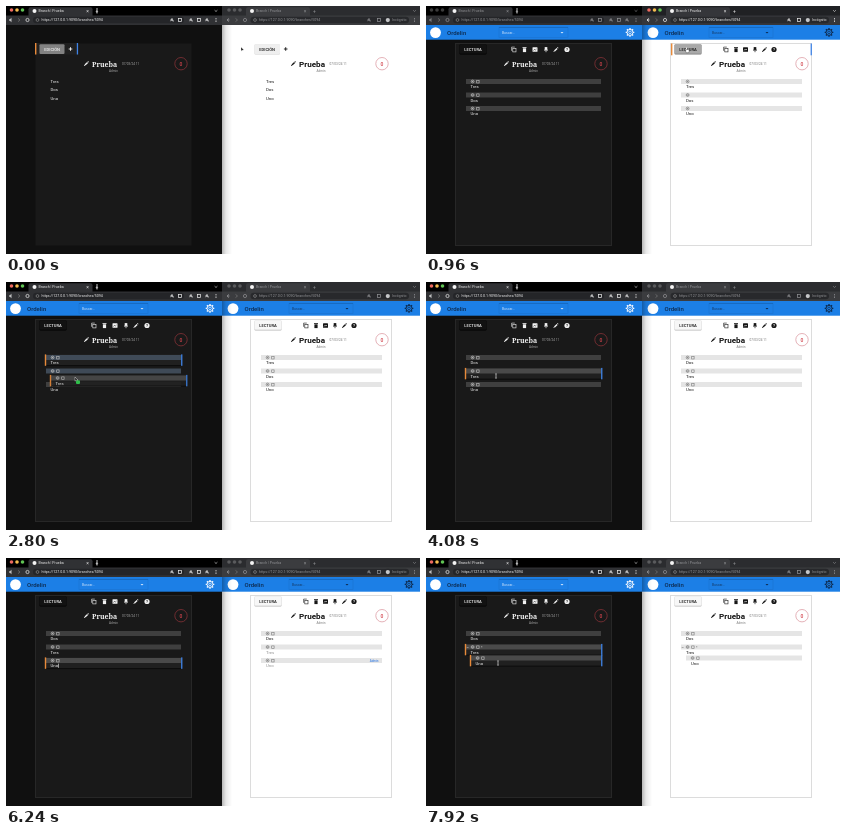
These frames come from a looping animation (414 by 248 pixels, 8 s). An HTML page with a canvas:

```html
<!DOCTYPE html>
<html lang="es">
<head>
<meta charset="utf-8">
<style>
html, body { margin: 0; width: 100%; height: 100%; overflow: hidden; background: #111; }
canvas { display: block; width: 414px; height: 248px; }
</style>
</head>
<body>
<canvas id="stage"></canvas>
<script>
const W = 414, H = 248, LOOP = 8000, STEP = 80, TOP = 19;
const canvas = document.getElementById('stage');
const scale = window.devicePixelRatio || 1;
canvas.width = W * scale;
canvas.height = H * scale;
const c = canvas.getContext('2d');
const SANS = 'Roboto, "Open Sans", sans-serif';
const SERIF = '"Noto Serif", serif';
const ORANGE = '#e88a3a', BLUE = '#3f83e6', BAR = '#1c7fe6';

const dark = {
  x: 0, w: 216, paper: [29.5, 37.5, 156, 202], page: '#101010', sheet: '#191919', edge: '#272727',
  ink: '#f2f2f2', soft: '#a5a5a5', card: '#3f3f3f', icon: '#c4c4c4', cell: '#202020',
  cardX: 40, cardR: 175, textX: 44.5, logo: 9.5, brand: 21, search: 76, arrow: 136, gear: 204,
  button: 34, tools: [88, 98.5, 109, 120, 130, 141], pencil: 80.5, title: 86,
  date: 116, author: 107.5, ring: 175, ringInk: '#853237', zero: '#d2434c', serif: true
};
const light = {
  x: 216, w: 198, paper: [244.5, 37.5, 141, 202], page: '#fff', sheet: '#fff', edge: '#dcdcdc',
  ink: '#161616', soft: '#777', card: '#e5e5e5', icon: '#777', cell: '#fff',
  cardX: 255, cardR: 376, textX: 260, logo: 227, brand: 238.5, search: 286, arrow: 341, gear: 403,
  button: 249, tools: [300, 310, 319.5, 329, 338.5, 348], pencil: 287.5, title: 293,
  date: 323.5, author: 315, ring: 376, ringInk: '#dd9fa6', zero: '#d2434c', serif: false
};

function rect(x, y, w, h, fill) {
  c.fillStyle = fill;
  c.fillRect(x, y, w, h);
}
function frame(x, y, w, h, color, lw = 0.5) {
  c.strokeStyle = color;
  c.lineWidth = lw;
  c.strokeRect(x, y, w, h);
}
function round(x, y, w, h, r, fill) {
  c.beginPath();
  c.roundRect(x, y, w, h, r);
  c.fillStyle = fill;
  c.fill();
}
function dot(x, y, r, fill) {
  c.beginPath();
  c.arc(x, y, r, 0, 7);
  c.fillStyle = fill;
  c.fill();
}
function ring(x, y, r, color, lw = 0.7) {
  c.beginPath();
  c.arc(x, y, r, 0, 7);
  c.strokeStyle = color;
  c.lineWidth = lw;
  c.stroke();
}
function line(color, lw, ...p) {
  c.beginPath();
  c.moveTo(p[0], p[1]);
  for (let i = 2; i < p.length; i += 2) c.lineTo(p[i], p[i + 1]);
  c.strokeStyle = color;
  c.lineWidth = lw;
  c.stroke();
}
function text(s, x, y, size, color, weight = 400, align = 'left', family = SANS) {
  c.font = `${weight} ${size}px ${family}`;
  c.textAlign = align;
  c.textBaseline = 'alphabetic';
  c.fillStyle = color;
  c.fillText(s, x, y);
}

function chrome(p, active) {
  const x = p.x, isDark = p === dark;
  const strip = isDark ? '#000' : active ? '#202124' : '#2b2c2f';
  const bar = isDark ? '#303134' : active ? '#35363a' : '#3b3c3f';
  const ink = active ? '#f0f0f0' : '#929396';
  const shift = isDark ? 0 : 217.5;
  rect(x, 0, p.w, 10, strip);
  rect(x, 9.5, p.w, TOP - 9.5, bar);
  ['#ee6a5f', '#f5bd4f', '#61c454'].forEach((col, i) =>
    dot(5.5 + 5.5 * i + shift, 4, 1.8, active ? col : isDark ? '#3c3c3c' : '#5a5b5d'));
  round(22.5 + shift, 1.2, 64, 9, [2, 2, 0, 0], bar);
  dot(28.5 + shift, 5, 2, '#f4f4f4');
  text('Branch | Prueba', 32.5 + shift, 6.3, 3.6, ink);
  text('×', 81.5 + shift, 6.7, 5, ink, 400, 'center');
  text('+', 91 + shift, 6.8, 5, ink, 400, 'center');
  if (isDark) line('#ddd', 0.9, 91, 2, 91, 7.5);
  const end = isDark ? 210 : 408.5;
  line(ink, 0.6, end - 1.4, 4.2, end, 5.5, end + 1.4, 4.2);

  const nav = isDark ? 4 : 221.5;
  line(ink, 0.8, nav + 1.5, 12.4, nav - 0.5, 14, nav + 1.5, 15.6);
  line(ink, 0.8, nav - 0.5, 14, nav + 2, 14);
  line('#777', 0.7, nav + 8, 12.4, nav + 10, 14, nav + 8, 15.6);
  ring(nav + 17.5, 14, 1.6, ink);
  round(nav + 23, 10.8, isDark ? 151 : 141, 6.4, 3.2, isDark ? '#242528' : '#28292c');
  ring(nav + 27.5, 14, 1.4, '#aaa', 0.5);
  text('https://127.0.0.1:9090/branches/5094', nav + 31.5, 15.3, 3.6, ink);
  const icons = isDark ? [166, 174, 185, 193, 201] : [363, 373];
  icons.forEach((ix, i) => {
    if (i % 2) frame(ix - 1.4, 12.6, 2.8, 2.8, ink, 0.7);
    else line(ink, 0.7, ix - 1.4, 15.2, ix, 12.4, ix + 1.4, 15.2, ix - 1.4, 13.6);
  });
  if (!isDark) {
    round(378, 10.8, 25, 6.4, 3.2, '#27282b');
    dot(381.8, 14.1, 2.1, '#c5c6c8');
    text('Incógnito', 386, 15.4, 3.5, ink);
  }
  for (let i = -1; i < 2; i++) dot(end, 14 + i * 1.6, 0.5, ink);
}

// Soft shade along the seam between the two windows
function seam() {
  const g = c.createLinearGradient(216, 0, 226, 0);
  g.addColorStop(0, 'rgba(0,0,0,0.28)');
  g.addColorStop(0.4, 'rgba(0,0,0,0.09)');
  g.addColorStop(1, 'rgba(0,0,0,0)');
  rect(216, TOP, 10, H - TOP, g);
}

function gear(x, y, color) {
  for (let i = 0; i < 8; i++) {
    const a = i * Math.PI / 4, u = Math.cos(a), v = Math.sin(a);
    line(color, 1.4, x + u * 3, y + v * 3, x + u * 4.3, y + v * 4.3);
  }
  ring(x, y, 3, color, 1);
  ring(x, y, 1.3, color, 0.7);
}

function appBar(p) {
  const navy = '#0d2b50';
  rect(p.x, TOP, p.w, 33.7 - TOP, BAR);
  dot(p.logo, 26.6, 5.4, '#fff');
  text('Ordelin', p.brand, 28.8, 6, navy, 500);
  frame(p.search - 3, 21.4, p.arrow - p.search + 9, 10.2, '#1b73d0', 0.6);
  line('#1663b5', 0.7, p.search - 3, 21.4, p.arrow + 6, 21.4);
  text('Buscar…', p.search, 27.8, 3.4, p === dark ? '#d5e7fa' : '#173a63');
  c.beginPath();
  c.moveTo(p.arrow - 1.5, 25.9);
  c.lineTo(p.arrow + 1.5, 25.9);
  c.lineTo(p.arrow, 27.5);
  c.fillStyle = p === dark ? '#d7e8fa' : navy;
  c.fill();
  gear(p.gear, 26.4, p === dark ? '#f4f8ff' : navy);
}

function pencil(x, y, color) {
  line(color, 1.4, x - 1.5, y + 1.5, x + 1.1, y - 1.1);
  line(color, 1.4, x + 1.5, y - 1.5, x + 2, y - 2);
  dot(x - 2, y + 2, 0.5, color);
}

function toolbar(p) {
  const [copy, bin, image, pin, edit, help] = p.tools, y = 43.5, k = p.ink;
  frame(copy - 1.2, y - 1.2, 3.2, 3.6, k, 0.6);
  line(k, 0.6, copy - 2.4, y + 1.3, copy - 2.4, y - 2.4, copy + 0.8, y - 2.4);
  rect(bin - 1.6, y - 1.2, 3.2, 3.8, k);
  rect(bin - 2, y - 2.4, 4, 0.8, k);
  round(image - 2.5, y - 2.3, 5, 4.6, 0.6, k);
  line(p.cell, 0.6, image - 1.5, y + 1, image - 0.4, y - 0.3, image + 0.4, y + 0.6, image + 1.5, y - 0.5);
  rect(pin - 1.3, y - 2.4, 2.6, 2.8, k);
  rect(pin - 2, y + 0.2, 4, 0.8, k);
  line(k, 0.7, pin, y + 1, pin, y + 2.7);
  pencil(edit, y, k);
  dot(help, y, 2.6, k);
  text('?', help, y + 1.5, 4, p.cell, 700, 'center');
}

function edges(x1, x2, y, h) {
  rect(x1, y, 1.4, h, ORANGE);
  rect(x2, y, 1.3, h, BLUE);
}

function heading(p) {
  pencil(p.pencil, 57.6, p.ink);
  if (p.serif) text('Prueba', p.title, 60.5, 6.9, p.ink, 700, 'left', SERIF);
  else text('Prueba', p.title, 60.7, 8.1, p.ink, 700);
  text('07/03/24 11', p.date, 58.8, 3.1, p.soft);
  text('Admin', p.author, 66, 3.1, p.soft, 400, 'center');
  ring(p.ring, 57.7, 6.2, p.ringInk, 0.8);
  text('0', p.ring, 59.6, 5, p.zero, 500, 'center');
}

function cardIcons(p, x, y, single) {
  ring(x, y, 1.4, p.icon, 0.7);
  dot(x, y, 0.6, p.icon);
  if (single) return;
  frame(x + 4.1, y - 1.1, 2.4, 2.6, p.icon, 0.6);
}

function card(p, label, y, o = {}) {
  const x = p.cardX + (o.dx || 0), r = p.cardR + (o.dr || 0);
  if (o.hover) {
    rect(x - 1, y - 0.6, r - x + 2, 11.4, p.cell);
    line('#050505', 0.7, x, y + 10.6, r, y + 10.6);
  }
  rect(x, y, r - x, 5, o.tint ? '#3f4a57' : o.hover ? '#4a4a4a' : p.card);
  cardIcons(p, x + 6.6, y + 2.5, o.single);
  if (o.parent) {
    text('−', x + 1.7, y + 4.2, 4.5, p.icon, 700, 'center');
    rect(x + 15, y + 2, 1.3, 0.7, p.icon);
  }
  const tx = x + p.textX - p.cardX;
  text(label, tx, y + 9.3, 4.3, o.dim ? '#929292' : p.ink);
  if (o.caret) rect(tx + c.measureText(label).width + 0.2, y + 5.6, 0.6, 4.2, p.ink);
  if (o.tag) text('Admin', r - 8, y + 3.5, 3, BLUE, 500, 'center');
  if (o.hover) edges(x - 1.2, r + 0.1, y - 0.6, 11.4);
}

function readButton(p, hover) {
  const x = p.button - 0.5;
  if (p === dark) {
    if (hover) {
      rect(29, 37, 43, 11.5, p.cell);
      edges(29, 70.8, 37, 11.5);
    }
    round(x, 38.2, 25, 9.8, 1, hover ? '#828282' : '#303030');
  } else {
    round(x, 38.6, 25.5, 10, 1, '#cfcfcf');
    round(x, 38.2, 25.5, 9.8, 1, '#efefef');
  }
  text('EDICIÓN', x + 12.6, 44.6, 4.1, p.ink, 500, 'center');
  const m = p === dark ? 64.5 : 279.7;
  line(p.ink, 0.9, m - 1.8, 43, m + 1.8, 43);
  line(p.ink, 0.9, m, 41.2, m, 44.8);
}

function pane(p, s) {
  rect(p.x, TOP, p.w, H - TOP, p.page);
  chrome(p, s.active);
  const [px, py, pw, ph] = p.paper;
  rect(px, py, pw, ph, p.sheet);
  if (!s.edit) {
    readButton(p, s.hover);
    heading(p);
    s.order.forEach((label, i) => text(label, p.textX, 77 + 8.4 * i, 4.3, p.ink));
    return;
  }
  appBar(p);
  frame(px, py, pw, ph, p.edge, 1);
  const b = p.button;
  round(b - 0.5, 38.6, 27, 9.8, 1, s.hover ? '#777' : p === dark ? '#000' : '#b5b5b5');
  round(b - 0.5, 38.2, 27, 9.6, 1, s.hover ? '#a9a9a9' : p === dark ? '#121212' : '#f7f7f7');
  text('LECTURA', b + 13, 44.9, 4.1, p.ink, 500, 'center');
  if (s.hover) edges(245, 384.6, 37.5, 11.8);
  toolbar(p);
  heading(p);
  s.order.forEach((label, i) => {
    const child = s.nested && i === 2;
    card(p, label, child ? 97.5 : 73 + 13.5 * i, {
      dx: child ? 5 : 0,
      parent: s.nested && i === 1,
      hover: s.hot && s.hot.includes(label),
      tint: s.tint && s.tint.includes(label),
      caret: s.caret === label,
      dim: s.dim && s.dim.includes(label),
      tag: s.tag === label,
      single: s.single
    });
  });
}

// Pointer route: time, x, y
const route = [
  [0, 236, 43], [480, 259, 44], [960, 261, 44], [1120, 261, 44], [1600, 100, 62],
  [1840, 65, 76], [2240, 65, 76], [2800, 70, 98], [3200, 70, 98], [3600, 70, 94],
  [4480, 70, 94], [4800, 60, 95], [5280, 60, 95], [5600, 56, 108], [6400, 56, 108],
  [6640, 65, 103], [6800, 65, 103], [7120, 68, 115], [7440, 72, 105], [8000, 72, 105]
];
function pointer(t) {
  const i = Math.max(1, route.findIndex(k => k[0] > t));
  const a = route[i - 1], b = route[i];
  let u = (t - a[0]) / (b[0] - a[0]);
  u = u * u * (3 - 2 * u);
  return [a[1] + (b[1] - a[1]) * u, a[2] + (b[2] - a[2]) * u];
}

function drawPointer(x, y, kind) {
  if (kind === 'beam') {
    line('#d8d8d8', 0.7, x, y - 2, x, y + 2);
    line('#d8d8d8', 0.5, x - 1, y - 2.2, x + 1, y - 2.2);
    line('#d8d8d8', 0.5, x - 1, y + 2.2, x + 1, y + 2.2);
    return;
  }
  if (kind === 'hand') {
    round(x - 1.3, y - 0.5, 3.4, 3.2, 1, '#fff');
    round(x - 0.9, y - 2.4, 1.1, 3, 0.5, '#fff');
    c.beginPath();
    c.roundRect(x - 1.3, y - 0.5, 3.4, 3.2, 1);
    c.strokeStyle = '#222';
    c.lineWidth = 0.4;
    c.stroke();
    return;
  }
  if (kind === 'copy') {
    round(x, y + 0.3, 4, 3.8, 1, '#2fbf4a');
    y -= 1;
  }
  c.beginPath();
  c.moveTo(x - 1, y - 2);
  c.lineTo(x - 1, y + 2.2);
  c.lineTo(x + 0.1, y + 1.2);
  c.lineTo(x + 2, y + 1);
  c.closePath();
  c.fillStyle = '#111';
  c.fill();
  c.strokeStyle = '#fff';
  c.lineWidth = 0.4;
  c.stroke();
}

function ghost(label, dx, dy, baseY) {
  c.save();
  c.globalAlpha = 0.9;
  card(dark, label, baseY + dy, { dx, dr: dx, hover: true });
  c.restore();
}

function draw(t) {
  const within = (a, b) => t >= a && t < b;
  const first = ['Tres', 'Dos', 'Uno'], later = ['Dos', 'Tres', 'Uno'];
  const rightActive = within(640, 1600);
  const [x, y] = pointer(t);
  const dragA = within(2320, 3280), dragB = within(6800, 7440);
  const nested = t >= 7440;

  let hot = [];
  if (within(1760, 5440)) hot = ['Tres'];
  else if (within(5440, 7440)) hot = ['Uno'];
  else if (nested) hot = ['Tres', 'Uno'];

  c.setTransform(scale, 0, 0, scale, 0, 0);
  pane(dark, {
    active: !rightActive, edit: t >= 240, hover: t < 240,
    order: t < 3280 ? first : later, nested, hot,
    tint: within(2640, 3280) ? ['Tres', 'Dos'] : [],
    caret: within(4880, 5440) ? 'Tres' : within(5680, 6640) ? 'Uno' : ''
  });
  pane(light, {
    active: rightActive, edit: t >= 800, hover: within(800, 1280), single: t < 1280,
    order: t < 3440 ? first : later, nested: t >= 7520,
    dim: [within(4960, 6480) ? 'Tres' : '', within(5760, 6800) ? 'Uno' : ''],
    tag: within(4960, 5600) ? 'Tres' : within(5760, 6800) ? 'Uno' : ''
  });
  seam();

  if (dragA) ghost('Tres', x - 65, y - 77.5, 73);
  if (dragB) ghost('Uno', x - 65, y - 103, 100);

  if (within(5760, 6400)) return;
  let kind = 'arrow';
  if (dragA || dragB) kind = 'copy';
  else if (within(480, 1280) || within(1840, 2320) || within(6640, 6800)) kind = 'hand';
  else if (t >= 3600) kind = 'beam';
  drawPointer(x, y, kind);
}

const start = performance.now();
function tick() {
  const t = (performance.now() - start) % LOOP;
  draw(Math.floor(t / STEP) * STEP);
  requestAnimationFrame(tick);
}
tick();
</script>
</body>
</html>
```
